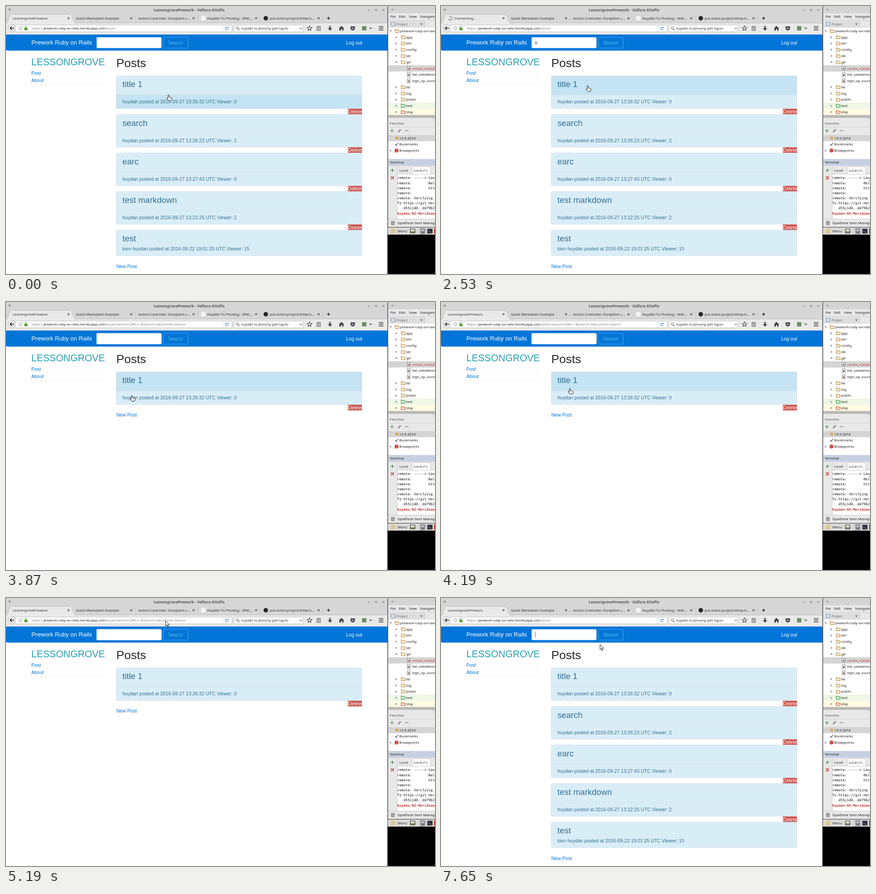
Recreate the animation shown at these times as an HTML page. Size 947 by 592 pixels, loop 8000 ms.

```html
<!DOCTYPE html>
<html lang="en">
<head>
<meta charset="utf-8">
<title>Search posts</title>
<style>
  html, body { margin: 0; width: 100%; height: 100%; overflow: hidden; background: #fff; }
  svg { display: block; width: 947px; height: 592px; }
  text { white-space: pre; font-family: "Noto Sans", "Open Sans", sans-serif; }
  .web text { font-family: "Liberation Sans", Arial, sans-serif; }
  text.mono { font-family: "DejaVu Sans Mono", monospace; }
  text.bold { font-weight: 700; }
</style>
</head>
<body>
<svg viewBox="0 0 947 592"><g id="still"></g><g id="live"></g></svg>
<script>
const LOOP = 8000;
const BLUE = '#0275d8', INFO = '#31708f';

const text = (x, y, s, size = 7.8, fill = '#2e2e2e', kind = '') =>
  `<text x="${x}" y="${y}" font-size="${size}" fill="${fill}" class="${kind}">${s}</text>`;
const rect = (x, y, w, h, fill, more = '') =>
  `<rect x="${x}" y="${y}" width="${w}" height="${h}" fill="${fill}" ${more}/>`;
const line = (d, stroke = '#444', w = 1, fill = 'none') =>
  `<path d="${d}" stroke="${stroke}" stroke-width="${w}" fill="${fill}"/>`;
const shape = (d, fill) => `<path d="${d}" fill="${fill}"/>`;
const dot = (x, y, r, fill, more = '') => `<circle cx="${x}" cy="${y}" r="${r}" fill="${fill}" ${more}/>`;
const cross = (x, y, r, color, w = 1) =>
  line(`M${x - r} ${y - r}l${2 * r} ${2 * r}m0 ${-2 * r}l${-2 * r} ${2 * r}`, color, w);
const plus = (x, y, r, color, w = 1) => line(`M${x - r} ${y}h${2 * r}M${x} ${y - r}v${2 * r}`, color, w);
const down = (x, y, fill = '#777') => shape(`M${x - 3} ${y - 1.5}h6l-3 4z`, fill);
const right = (x, y) => shape(`M${x - 2} ${y - 3}v6l4 -3z`, '#a5a5a5');

function star(x, y, r) {
  let d = '';
  for (let i = 0; i < 10; i++) {
    const a = i * Math.PI / 5, q = i % 2 ? r * 0.45 : r;
    d += (i ? 'L' : 'M') + (x + q * Math.sin(a)).toFixed(2) + ' ' + (y - q * Math.cos(a)).toFixed(2);
  }
  return d + 'z';
}

function browserFrame() {
  let s = rect(0, 0, 842, 63, '#d6d6d6') + down(8, 8) +
    text(326, 12, 'LessongrovePrework - Vellora Kitefin', 8.53, '#5a5a5a', 'bold') +
    line('M799 9.5h5', '#777') + plus(817, 9, 2.8, '#777') + cross(833, 9, 2.5, '#777');
  // tabs
  s += rect(0, 38, 842, 25, '#e9e9e9') + line('M0 37.5H842', '#bdbdbd') +
    line('M0 38C7 38 5 18.5 12 18.5H141C148 18.5 147 38 154 38', '#b5b5b5', 0.8, '#e9e9e9');
  ['Quick Markdown Example', 'Action Controller: Exception c...', 'Huydân Tú Phượng - Wiki...', 'pre-exam-project/show.h...']
    .forEach((name, i) => s += text(154 + i * 138 + (i > 1 ? 14 : 0), 29.8, name, 7.85));
  for (let i = 0; i < 5; i++) {
    s += cross(138 + i * 138, 27, 2.1, '#444', 1.1);
    if (i) s += line(`M${147.5 + i * 138} 22v12`, '#c2c2c2', 0.7);
  }
  s += rect(430.5, 22, 10, 10, '#f4f4f4') + dot(573.5, 27, 5, '#24292e') + plus(712, 27, 3, '#333', 1.8);
  // toolbar
  const field = 'stroke="#b4b4b4" stroke-width=".8" rx="1.5"';
  s += rect(20, 42, 479, 15, '#fff', field) + rect(503.5, 42, 152, 15, '#fff', field) +
    dot(13, 49, 8.3, '#f3f3f3', 'stroke="#a2a2a2" stroke-width=".8"') +
    line('M18 49H9.5M13 45l-4 4l4 4', '#444', 1.8) +
    dot(32, 49.3, 3.8, 'none', 'stroke="#888" stroke-width=".8"') + line('M32 48.5v3M32 46.5v1', '#888', 0.9) +
    rect(40.5, 48.5, 7, 5, '#4d9a2c') + line('M42 49v-2a2 2 0 0 1 4 0v2', '#4d9a2c', 1.2) +
    line('M478.5 43v13', '#d0d0d0', 0.8) + line('M490 47.5A3 3 0 1 0 490.5 50.5', '#4b86c4', 1.1) +
    shape('M491.5 45.5v3.5h-3.5z', '#4b86c4') +
    dot(510.5, 48.4, 2.6, 'none', 'stroke="#555"') + line('M512.4 50.3l3 3', '#555', 1.3) +
    text(519, 52.2, 'huydan tu phuong giet nguoi', 7.55) + line('M646 49.5h7M650 46.5l3 3l-3 3', '#777', 0.9);
  s += line(star(670, 49.3, 5.5), '#444', 1.1) +
    rect(686.5, 45.5, 7.5, 8.5, 'none', 'stroke="#444"') + line('M688.5 45h3.5M688 48.5h4.5M688 51h4.5', '#444', 1.1) +
    shape('M713.7 44h3v5h3.3l-4.8 5.5l-4.8 -5.5h3.3z', '#444') +
    shape('M740.5 44l6 5.5h-1.5v5h-3v-3.5h-3v3.5h-3v-5h-1.5z', '#444') +
    shape('M760.5 45h10v4a5 5 0 0 1 -10 0z', '#444') + line('M763 48l2.5 2.5l2.5 -2.5', '#e9e9e9', 1.2) +
    rect(786, 44.5, 9.5, 9.5, '#6a8f63') + line('M802 47.5l3 3l3 -3', '#444', 1.2) +
    line('M823 45.5h10M823 49.3h10M823 53h10', '#3c3c3c', 1.6);
  return s;
}

function pageFrame() {
  return '<g class="web">' + shape('M0 63H842V98.5H3Q0 98.5 0 95.5z', BLUE) +
    text(56, 85.3, 'Prework Ruby on Rails', 13.16, '#fff') +
    rect(347, 69, 55.2, 24, 'none', 'rx="2.5" stroke="#5bb9e4" stroke-width=".8"') +
    text(357.7, 85, 'Search', 10.53, '#5bb9e4') + text(751, 84.5, 'Log out', 10.53, '#fff') +
    text(56, 131.3, 'LESSONGROVE', 21.2, '#2ca2b4') + text(243.5, 135.3, 'Posts', 26.3, '#292b2c') +
    line('M56 156.5H220M56 172.5H220', '#ececec', 0.8) + '</g>';
}

function folder(x, y, color = '#bd9150', fill = '#f8ecd4') {
  return line(`M${x - 4} ${y - 3.5}h3l1 1.5h4.5v5.5h-8.5z`, color, 1.2, fill);
}

function editorWindow() {
  let s = rect(842, 0, 1.6, 505, '#3a3a3a') + rect(843.6, 0, 104, 505, '#e8e8e8') +
    rect(843.6, 0, 104, 16, '#d4d4d4') + down(853, 8, '#999');
  [['File', 848], ['Edit', 867.5], ['View', 889.5], ['Navigate', 914]].forEach(([name, x]) =>
    s += text(x, 26.3, name, 7.8, '#222'));
  s += line('M844 31.5H947', '#cfcfcf') + rect(846, 33, 77, 14, '#dedede') + line('M923.5 33v14', '#bbb') +
    rect(850.5, 36.5, 8, 7, '#d9e4ee', 'stroke="#71879b" stroke-width=".9"') +
    text(862, 42.8, 'Project', 7.5, '#666') + down(917, 40);
  // project tree
  s += rect(844, 48, 103, 193, '#fff');
  const rows = ['prework-ruby-on-rails', 'app', 'bin', 'config', 'db', 'gif', 'create_markdown.gif', 'fail_validation.gif',
    'sign_up_success.gif', 'lib', 'log', 'public', 'test', 'tmp'];
  rows.forEach((name, i) => {
    const y = 55.1 + i * 13.78, file = i > 5 && i < 9, bg = { 6: '#d4d4d4', 12: '#ecf7e5', 13: '#fffbe2' }[i];
    if (bg) s += rect(844, y - 6.9, 103, 13.8, bg);
    if (file) s += rect(885.7, y - 4.5, 6.5, 9, '#f4f4f4', 'stroke="#777" stroke-width=".9"') + rect(887.5, y - 1, 3.3, 3.5, '#8d5555');
    else s += (i == 0 ? down(849, y, '#999') : i == 5 ? down(862, y, '#999') : right(862, y)) +
      (i == 12 ? folder(876.5, y, '#3e9a4b', '#dff2df') : i == 13 ? folder(876.5, y, '#b5503c', '#f7dcd2') : folder(i ? 876.5 : 863, y));
    s += text(file ? 896.5 : i ? 883.5 : 870, y + 2.8, name, 7.8, i == 6 ? '#c5443c' : '#222');
  });
  s += rect(844, 240.7, 103, 6.3, '#b9b9b9') + rect(940, 247, 7, 3, '#d5d5d5');
  // favorites
  s += text(847, 261.8, 'Favorites', 7.5, '#555') + line('M844 267.5H947', '#ccc', 0.8) +
    plus(852, 275.5, 3.7, '#4e9a4e', 1.4) + line('M865 279l1 -3l4.5 -4l1.5 1.5l-4.5 4.5z', '#777', 0.8, '#999') +
    line('M880 275.5h8', '#777', 1.2) +
    rect(844, 284.5, 103, 53.5, '#fff') + rect(844, 284.8, 103, 13.8, '#d4d4d4') +
    shape(star(862.5, 291.8, 5), '#dba64a') + text(868, 294.6, '13-9-2016', 7.8, '#222') +
    line('M859 305l2.5 3l4 -6', '#444', 1.2) + text(868, 308.4, 'Bookmarks', 7.8, '#222') +
    right(849, 319.3) + dot(862, 319.3, 4, '#c85a48', 'stroke="#9a3c30" stroke-width=".8"') +
    text(868, 322.1, 'Breakpoints', 7.8, '#222');
  // terminal
  s += rect(844, 338, 103, 15, '#c6d0e1') + text(847, 348, 'Terminal', 7.7, '#222') +
    rect(863, 371, 84, 99, '#fff') + line('M863 371.5H947M863.5 355v115', '#bdbdbd', 0.8) +
    rect(897, 355, 40, 17, '#fff', 'stroke="#bbb" stroke-width=".8"') +
    text(868.5, 366, 'Local', 7.8) + text(900, 366, 'Local (1)', 7.8) +
    plus(853, 363, 4, '#4e9a4e', 1.5) + cross(853, 379.5, 3.4, '#c5443c', 1.7);
  const pad = ' '.repeat(8);
  ['remote: -----> Launching...', `remote:${pad}Released v31`, `remote:${pad}https://prework`, 'remote:',
    'remote: Verifying deploy', 'To https://git.heroku.com', '   d55c140..dd7962c']
    .forEach((row, i) => s += text(863.6, 382.4 + i * 11.17, row, 7.66, '#111', 'mono'));
  s += text(863.6, 460.6, 'huydan-QX-Meridian', 7.66, '#c0392b', 'mono bold');
  s += line('M844 470.5H947', '#c4c4c4', 0.8) + rect(850, 475, 8, 8.5, '#888') + line('M851 477.5h6M851 480.5h6', '#eee', 0.8) +
    text(864, 481.8, 'OpalDesk Gem Manager', 7.8, '#222') + rect(843, 488, 104, 1.5, '#555');
  // desktop panel
  s += rect(843, 489.5, 104, 15.5, '#dadada') + rect(849.5, 492, 10, 10, '#d9c994') + text(864, 500, 'Menu', 7.9, '#333') +
    rect(892, 492, 11.5, 10, '#555', 'rx="1"') + rect(893.5, 493.5, 8.5, 4, '#f2f2e6') + rect(893.5, 498, 8.5, 2.5, '#7d9c52') +
    rect(913, 490, 14, 15, '#b9b9b9') + rect(916, 492, 8, 10.5, '#777', 'rx="1"') + rect(917.5, 493.5, 5, 4, '#ddd') +
    rect(930, 492, 11.5, 10.5, '#2c2f3a', 'rx="1"') + line('M932.5 495l2 2l-2 2M936 499.5h3', '#eee', 0.8) +
    rect(945, 491, 2, 12, '#b8322a') + rect(842, 505, 105, 87, '#000');
  return s;
}

// pointer tip: time, x, y
const path = [
  [0, 359, 196], [670, 359, 196], [1040, 324, 176], [3380, 324, 176], [3560, 285, 160], [3700, 232, 172],
  [3800, 262, 186], [3870, 277.5, 206.5], [4000, 330, 205], [4150, 300, 180], [4190, 285, 190], [4260, 262, 223],
  [4350, 284, 148], [4430, 284, 141], [4600, 330, 110], [4800, 270, 90], [4990, 210, 74], [5230, 380, 46],
  [5400, 462, 44], [5600, 230, 70], [5740, 29, 150], [5800, 120, 268], [5830, 140, 262], [5950, 70, 163],
  [6140, 70, 163], [6340, 70.5, 151], [6600, 70.5, 151], [6900, 200, 110], [7200, 300, 78], [7360, 300, 78],
  [7650, 351, 103], [LOOP, 351, 103]
];

function pointer(t) {
  const i = path.findIndex(p => p[0] > t);
  const [a, x, y] = path[i - 1], [b, u, v] = path[i], k = (t - a) / (b - a);
  return [x + (u - x) * k, y + (v - y) * k];
}

const posts = [['title 1', '27 13:26:32', 0], ['search', '27 13:26:23', 2], ['earc', '27 13:27:43', 0],
  ['test markdown', '27 13:22:25', 2], ['test', '22 19:01:25', 15]];

function card(i, hover) {
  const [title, when, views] = posts[i], y = 154.2 + i * 85.2, last = i == 4, h = last ? 56.4 : 72.4;
  let s = rect(243.4, y, 542.2, h, '#d9edf7', 'rx="2.5"');
  if (hover == 'title') s += rect(243.4, y, 542.2, 42, '#c4e3f3');
  if (hover == 'meta') s += rect(243.4, y + 42, 542.2, 30.4, '#c4e3f3');
  s += rect(243.4, y, 542.2, h, 'none', 'rx="2.5" stroke="#d3dde2" stroke-width=".8"') +
    text(257, y + 25.2, title, 18.5, INFO) +
    text(257, y + (last ? 45 : 61.2), `${last ? 'kien ' : ''}huydan posted at 2016-09-${when} UTC Viewer: ${views}`, 10.5, INFO);
  if (!last) s += line(`M243.4 ${y + 42}h542.2`, '#d0dfe6', 0.8) + rect(754.8, y + 72.8, 30.9, 12.5, '#c9504a') +
    text(755.1, y + 82.8, 'Delete', 10.53, '#fff');
  return s;
}

function link(x, y, s, over) {
  const w = s == 'Post' ? 21 : 28;
  return text(x, y, s, 10.53, over ? '#014c8c' : BLUE) + (over ? line(`M${x} ${y + 1.3}h${w}`, '#014c8c', 0.8) : '');
}

function popup(items) {
  return rect(199.5, 93.5, 144, items.length * 11.6 + 1, '#fff', 'stroke="#b0b0b0" stroke-width=".8"') +
    items.map((s, i) => text(204, 102.4 + i * 11.6, s)).join('');
}

function spinner(t) {
  const at = a => `${20 + 4 * Math.cos(a)} ${27 + 4 * Math.sin(a)}`;
  return line(`M${at(t / 110)}A4 4 0 1 1 ${at(t / 110 - 1.5)}`, '#888', 1.5);
}

function live(t) {
  const found = t >= 2970 && t < 6950, loading = t >= 2530 && t < 3010;
  const [x, y] = pointer(t), [hx, hy] = pointer(Math.max(0, t - 60)); // hover lags behind the pointer
  const inCard = hx > 243 && hx < 786 && hy > 154 && hy < 227;
  const hover = inCard ? (hy < 195 ? 'title' : 'meta') : '';
  const onLink = hx > 54 && hx < 86 && hy > 142 && hy < 173 ? (hy < 157 ? 'Post' : 'About') : '';
  const typed = t < 1760 || t >= 2970 ? '' : t < 1900 ? 't' : 'ti';
  const focus = t < 2970 || t >= 7440, caret = focus && (t >= 850 && t < 2530 || t >= 7440);

  let s = loading ? spinner(t) + text(29, 29.8, 'Connecting…', 7.85) : text(15, 29.8, 'LessongrovePrework', 7.85);
  const query = t >= 2970 && t < 6550 ? '/search?utf8=✓&amp;search=ti&amp;commit=Search' : '';
  s += text(56.5, 52.2, `https://<tspan fill="#222">prework-ruby-on-rails.herokuapp.com</tspan>/posts${query}`, 7.66, '#858585');

  s += '<g class="web">' + rect(200, 69, 143.2, 24, '#fff', `rx="2.5" stroke="${focus ? '#66afe9' : '#d5dfe8'}" stroke-width=".8"`) +
    text(207.5, 84.8, typed, 10.53, '#55595c');
  if (caret) s += rect(207.6 + [0, 2.9, 5.3][typed.length], 75, 0.8, 12.5, '#444');
  s += link(56, 152, 'Post', onLink == 'Post') + link(56, 168.3, 'About', onLink == 'About');
  for (let i = 0; i < (found ? 1 : 5); i++) s += card(i, i ? '' : hover);
  s += text(243.4, found ? 253.3 : 578.9, 'New Post', 10.6, BLUE) + '</g>';

  if (t >= 1760 && t < 1900) s += popup(['t', 'ti', 'title', 'title 1', 'test', 'test 1', 'test markdown', 'text']);
  if (t >= 1900 && t < 2530) s += popup(['ti', 'title', 'title 1']);

  const outline = inCard || onLink
    ? 'M-1.3 1C-1.3 -.6 1 -.6 1 1V5L5.5 6Q7.5 6.5 7 9L6 12.5H-.5L-3.5 8.5Q-4 6.8 -2.5 7.2L-1.3 8.5Z'
    : 'M0 0V11L2.6 8.8L4.4 13L6.2 12.2L4.4 8.2H7.8Z';
  return s + `<g transform="translate(${x} ${y})">${line(outline, '#1a1a1a', 1, '#fff')}</g>`;
}

document.getElementById('still').innerHTML = browserFrame() + pageFrame() + editorWindow();
const stage = document.getElementById('live'), start = performance.now();
function draw() {
  stage.innerHTML = live(Math.max(0, performance.now() - start) % LOOP);
  requestAnimationFrame(draw);
}
draw();
</script>
</body>
</html>
```
